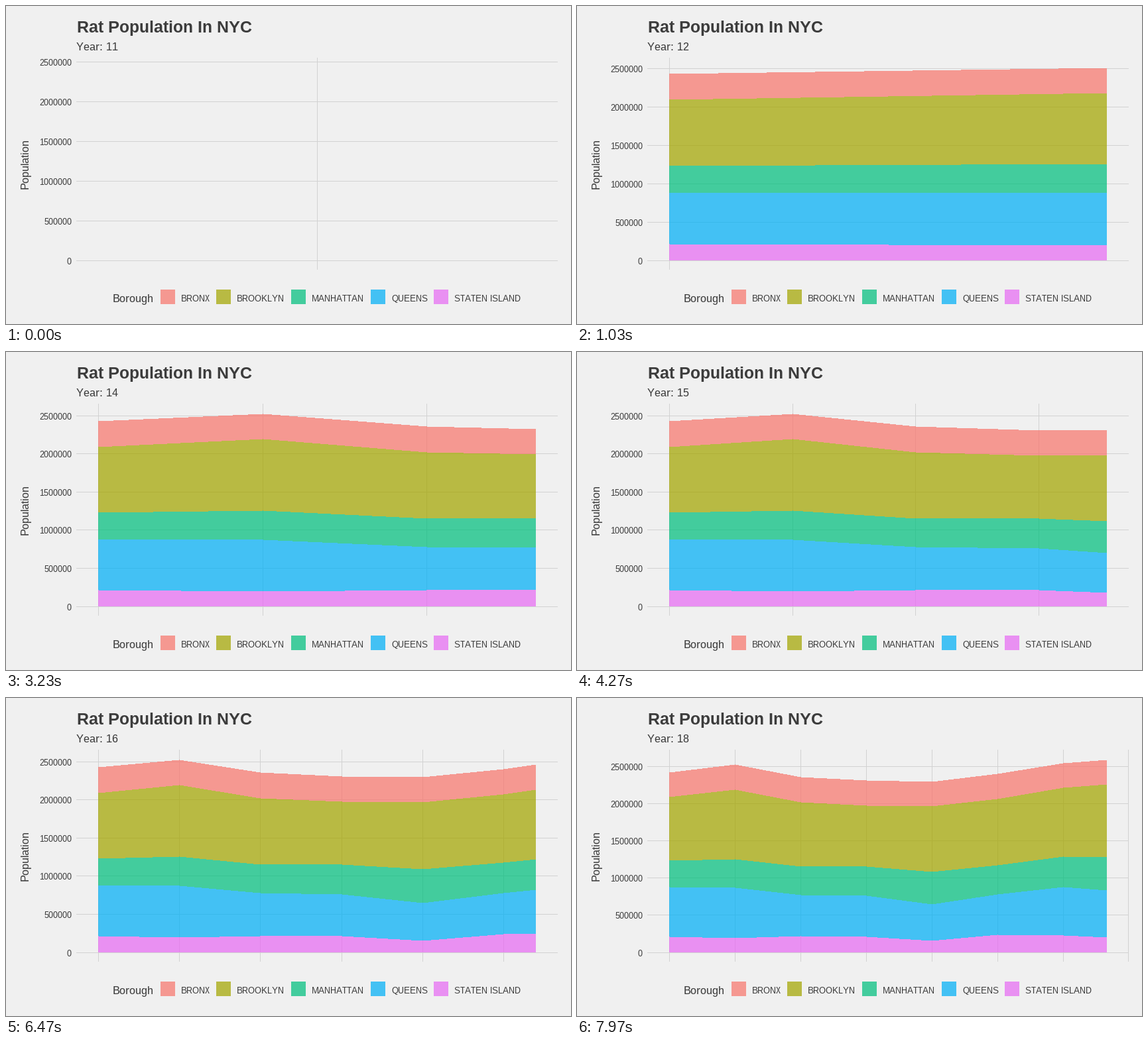
Write a matplotlib script that moves like this. It is 852 px wide and 480 px high and loops after 8 s.

```python
import math

import numpy as np
import matplotlib.pyplot as plt
from matplotlib.animation import FuncAnimation
from matplotlib.collections import LineCollection
from matplotlib.colors import to_rgba_array
from matplotlib.patches import Rectangle

W, H, DPI = 852, 480, 96
FRAMES, LOOP_MS = 240, 8000
BG, GRID, INK = "#F0F0F0", "#D2D2D2", "#3C3C3C"
ALPHA = 0.72

# Panel geometry in pixels
LEFT, RIGHT, TOP, BOTTOM = 106, 832, 78, 398
X0, X1 = 139, 799
BASE, SPAN = 383.6, 290.9

FIRST_YEAR, FRAMES_PER_YEAR = 11, 35.9
TICKS = range(0, 2500001, 500000)

# Name, colour, swatch x; the first one lies on top of the stack
BOROUGHS = [
    ("BRONX", "#F8766D", 233),
    ("BROOKLYN", "#A3A500", 317),
    ("MANHATTAN", "#00BF7D", 430),
    ("QUEENS", "#00B0F6", 550),
    ("STATEN ISLAND", "#E76BF3", 645),
]

plt.rcParams.update({
    "font.family": "Liberation Sans",
    "text.hinting": "native",
    "text.hinting_factor": 1,
    "text.kerning_factor": 6,
})


def snap(v):
    return np.floor(np.asarray(v) + 0.5)


def stack_tops():
    """Top of each area in millions by year, in the order of BOROUGHS."""
    staten = np.array([.2145, .193, .217, .210, .156, .241, .230, .186])
    queens = np.array([.875, .874, .775, .760, .644, .780, .878, .818])
    total = np.array([2.424, 2.525, 2.355, 2.309, 2.299, 2.400, 2.549, 2.614])
    # Manhattan grows slowly and moves against Staten Island
    growth = 0.36 + 0.0115 * np.arange(len(total))
    manhattan = queens + growth + 0.7 * (0.21 - staten)
    brooklyn = total - 0.332
    return np.array([total, brooklyn, manhattan, queens, staten])


TOPS = stack_tops()
YEARS = np.arange(TOPS.shape[1])
YEAR_FRAMES = snap(YEARS * FRAMES_PER_YEAR)

fig = plt.figure(figsize=(W / DPI, H / DPI), dpi=DPI, facecolor=BG)
ax = fig.add_axes([0, 0, 1, 1])
ax.axis("off")


def label(x, y, text, px, **kw):
    return ax.text(x, y, text, fontsize=px * 72 / DPI, color=INK,
                   va="baseline", **kw)


label(107, 40, "Rat Population In NYC", 25, weight="bold")
subtitle = label(106, 67, "", 16.5)
label(34, 238, "Population", 17, rotation=90, ha="center",
      rotation_mode="anchor")
label(161, 447, "Borough", 17)
for name, color, x in BOROUGHS:
    ax.add_patch(Rectangle((x, 428), 22, 22, facecolor=color, alpha=ALPHA,
                           linewidth=0))
    label(x + 31, 446, name, 13)
tick_labels = [label(99, 0, str(v), 13, ha="right") for v in TICKS]

grid = LineCollection([], colors=GRID, linewidths=72 / DPI, zorder=1)
grid.set_snap(False)
ax.add_collection(grid, autolim=False)

# Areas are filled by whole pixels, without antialiasing
floor_y = int(snap(BASE))
rows = np.arange(TOP, floor_y)
cols = np.arange(X0, X1)
palette = to_rgba_array(["none"] + [color for _, color, _ in BOROUGHS])
palette[1:, 3] = ALPHA
palette = np.round(palette * 255).astype(np.uint8)
areas = ax.imshow(np.zeros((len(rows), len(cols), 4), np.uint8),
                  extent=(X0, X1, floor_y, TOP), aspect="auto",
                  interpolation="nearest", zorder=2)
ax.set_xlim(0, W)
ax.set_ylim(H, 0)


def fill_areas(xs, tops, scale):
    layer = np.zeros((len(rows), len(cols)), int)
    for top in tops:
        edge = np.interp(cols, xs, snap(BASE - top * scale))
        layer += rows[:, None] >= edge - 1e-9
    areas.set_data(palette[layer])


def draw(n):
    t = float(np.interp(n, YEAR_FRAMES, YEARS))
    years = np.append(np.arange(math.ceil(t)), t)
    tops = np.array([np.interp(years, YEARS, row) for row in TOPS])
    scale = SPAN / tops[0].max()

    year = FIRST_YEAR + math.floor(n / FRAMES_PER_YEAR + 0.5)
    subtitle.set_text(f"Year: {year}")

    lines = []
    for v, text in zip(TICKS, tick_labels):
        y = float(snap(BASE - v / 1e6 * scale))
        lines.append([(LEFT, y + 0.5), (RIGHT, y + 0.5)])
        text.set_y(y + 6)

    areas.set_visible(t > 0)
    marks = [(LEFT + RIGHT) / 2]
    if t > 0:
        unit = (X1 - X0) / t
        marks = [X0 + k * unit for k in range(int(t * 1.05 + 1e-6) + 1)]
        fill_areas(snap(X0 + years * unit), tops, scale)
    for x in marks:
        x = min(float(snap(x)), RIGHT - 1) + 0.5
        lines.append([(x, TOP), (x, BOTTOM)])
    grid.set_segments(lines)
    return [subtitle, grid, areas, *tick_labels]


anim = FuncAnimation(fig, draw, frames=FRAMES, interval=LOOP_MS / FRAMES,
                     init_func=lambda: draw(0), repeat=True, repeat_delay=0,
                     blit=False)
plt.show()
```
